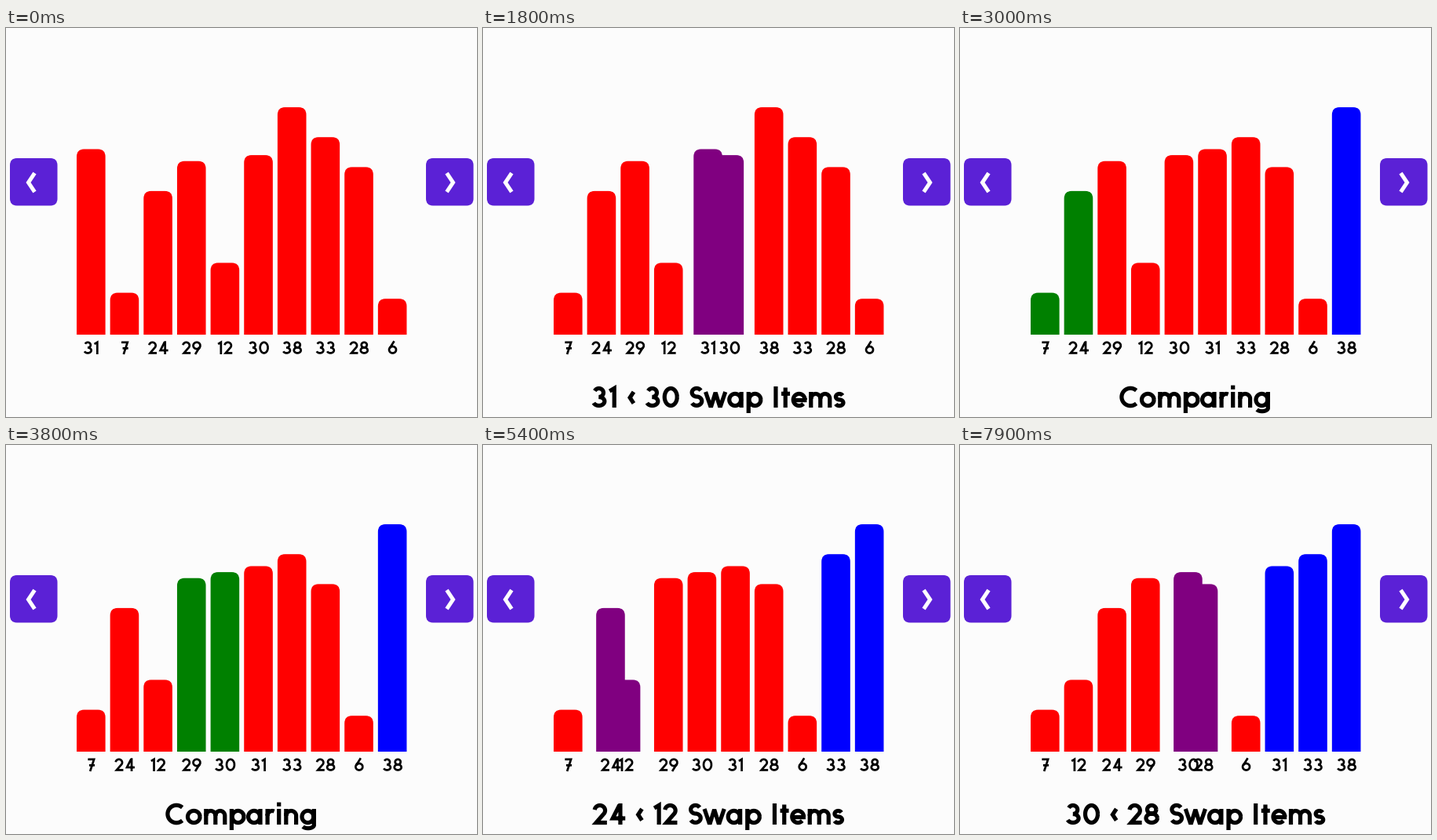
A matplotlib script that plays this animation: 600x496 px, repeating every 8 s.

```python
import numpy as np
import matplotlib.pyplot as plt
from matplotlib.animation import FuncAnimation
from matplotlib.patches import FancyBboxPatch, PathPatch
from matplotlib.path import Path

W, H, DPI = 600, 496, 100
PX = 72 / DPI                       # points per pixel
LEFT, PITCH, BAR_W, BASE, UNIT = 90, 42.65, 36.6, 391, 7.63
VALUES = [31, 7, 24, 29, 12, 30, 38, 33, 28, 6]

STEP, COMPARE, SLIDE = 238, 110, 100        # ms
PASS_STARTS = [720, 2952, 5025, 6811]


# ---- stroke lettering: y up from the baseline, capitals 27 high ----
def arc(cx, cy, rx, ry, a=0, b=360):
    t = np.radians(np.linspace(a, b, 40))
    return list(zip(cx + rx * np.cos(t), cy + ry * np.sin(t)))


def stem(x, low=0, high=20):
    return [(x, low), (x, high)]


def arch(x, r):
    """Half-round shoulder springing from x, ending in a leg."""
    return arc(x + r, 11.3, r, 6.2, 180, 0) + [(x + 2 * r, 0)]


DIGITS = {
    "0": (23, arc(11.5, 13.5, 8, 11)),
    "1": (12, [(1.5, 21), (7.5, 24.6), (7.5, 0)]),
    "2": (20, arc(9.2, 18, 6.7, 6.5, 172, -35) + [(4.5, 2.5), (18.2, 2.5)]),
    "3": (21, arc(9.5, 19, 5.8, 5.5, 155, -90),
          arc(9.5, 8, 7.2, 5.5, 90, -158)),
    "4": (22, [(21, 8), (5, 8), (13.6, 25)], stem(14.7, 0, 27)),
    "6": (20.5, arc(10.2, 9.2, 7.2, 6.8), [(13.4, 27), (4.3, 12.6)]),
    "7": (18, [(2, 24.5), (14.5, 24.5), (6.5, 0)], [(4.5, 12.3), (16, 12.3)]),
    "8": (20.5, arc(10.2, 19.2, 5.7, 5.3), arc(10.2, 8.2, 7.2, 5.7)),
    "9": (20.5, arc(10.2, 17.8, 7.2, 6.8), [(7, 0), (16.1, 14.4)]),
}
ROUND = {
    "C": (25, arc(14, 13.5, 11.2, 11.2, 48, 312)),
    "S": (18, arc(9.2, 19.3, 6, 5.3, 28, 270),
          arc(9.2, 8.3, 6.6, 5.7, 90, -152)),
    "a": (22.5, arc(10, 10, 7.4, 7.6), stem(18)),
    "e": (20.5, arc(10, 10, 7.4, 7.6, 0, 318), [(3, 9.4), (19.8, 9.4)]),
    "g": (22.5, arc(10, 10, 7.4, 7.6),
          [(18, 20), (18, -0.5)] + arc(10.4, -0.5, 7.6, 4.2, 0, -150)),
    "o": (21.5, arc(10.6, 10, 7.8, 7.6)),
    "p": (22, stem(4, -7), arc(12.2, 10, 7.4, 7.6)),
    "s": (15.5, arc(7.6, 13.8, 4.5, 3.7, 25, 270),
          arc(7.6, 6.2, 5, 3.9, 90, -155)),
}
STRAIGHT = {
    " ": (11,),
    "‹": (10, [(8, 20), (3.2, 12.7), (8, 5.4)]),
    "I": (10, stem(4.5, 0, 27)),
    "i": (8.5, stem(4), stem(4, 23.2, 28.4)),
    "m": (32, stem(4), arch(4, 6), arch(16, 6)),
    "n": (21, stem(4), arch(4, 6.4)),
    "r": (14, stem(4), arc(10, 11.3, 6, 6.2, 180, 65)),
    "t": (13, stem(6.2, 0, 25.5), [(1, 17.7), (12, 17.7)]),
    "w": (29, [(2, 20), (8, 2.4), (9.4, 2.4), (14, 17.3), (15.2, 17.3),
               (19.8, 2.4), (21.2, 2.4), (27.2, 20)]),
}
GLYPHS = {**DIGITS, **ROUND, **STRAIGHT}
TRACKING = 0.6


def text_path(text, cx, baseline, scale=1.0):
    width = sum(GLYPHS[c][0] + TRACKING for c in text) - TRACKING
    x = -width / 2
    pts, codes = [(cx, baseline)], [Path.MOVETO]
    for c in text:
        advance, *strokes = GLYPHS[c]
        for s in strokes:
            pts += [(cx + (x + px) * scale, baseline - py * scale)
                    for px, py in s]
            codes += [Path.MOVETO] + [Path.LINETO] * (len(s) - 1)
        x += advance + TRACKING
    return Path(pts, codes)


def bar_path(x, value, r=9.5):
    top, right = BASE - value * UNIT, x + BAR_W
    pts = [(x, BASE), (x, top + r), (x, top), (x + r, top), (right - r, top),
           (right, top), (right, top + r), (right, BASE), (x, BASE)]
    L, Q = Path.LINETO, Path.CURVE3
    return Path(pts, [Path.MOVETO, L, Q, Q, L, Q, Q, L, Path.CLOSEPOLY])


# ---- bubble sort timeline ----
def plan():
    steps, order = [], VALUES[:]
    for done, start in enumerate(PASS_STARTS):
        last = len(order) - 2 - done
        for i in range(last + 1):
            swap = order[i] > order[i + 1]
            steps.append((start + i * STEP, order[:], i, swap, done, i == last))
            if swap:
                order[i], order[i + 1] = order[i + 1], order[i]
    return steps


STEPS = plan()


def state(t):
    """Slot and colour of every value, and the message, at time t."""
    past = [s for s in STEPS if s[0] <= t]
    if not past:
        return {v: (k, "red") for k, v in enumerate(VALUES)}, ""
    start, order, i, swap, done, last = past[-1]
    age = t - start
    a, b = order[i], order[i + 1]
    slots = {v: float(k) for k, v in enumerate(order)}
    message, active = "Comparing", "green"
    if swap and age >= COMPARE:
        p = min(1, (age - COMPARE) / SLIDE)
        slots[a] += p
        slots[b] -= p
        message, active = f"{a} ‹ {b} Swap Items", "purple"
    resting = last and age >= STEP
    done += resting
    fixed = sorted(VALUES)[len(VALUES) - done:]

    def colour(v):
        if v in fixed:
            return "blue"
        return active if v in (a, b) and not resting else "red"

    return {v: (slots[v], colour(v)) for v in VALUES}, message


# ---- stage ----
fig = plt.figure(figsize=(W / DPI, H / DPI), dpi=DPI, facecolor="#fcfcfc")
ax = fig.add_axes([0, 0, 1, 1])
ax.set(xlim=(0, W), ylim=(H, 0))
ax.axis("off")


def stroke(path, width, color="black"):
    return ax.add_patch(PathPatch(path, fill=False, edgecolor=color, lw=width * PX,
                                  capstyle="butt", joinstyle="miter", zorder=3))


for bx, xs in ((5, (36.5, 28.5)), (535, (561.5, 569.5))):
    ax.add_patch(FancyBboxPatch((bx, 166), 60.5, 60.5, fc="#5b21d6", lw=0,
                                boxstyle="round,pad=0,rounding_size=9"))
    stroke(Path([(xs[0], 185), (xs[1], 197), (xs[0], 209)]), 5, "white")

bars = {v: ax.add_patch(PathPatch(bar_path(0, v), lw=0)) for v in VALUES}
labels = {v: stroke(text_path(str(v), 0, 416), 2.7) for v in VALUES}
title = stroke(text_path("", W / 2, 484), 5.2)


def draw(k):
    places, message = state(k * 100)
    for v, (slot, color) in places.items():
        x = LEFT + slot * PITCH
        bars[v].set_path(bar_path(x, v))
        bars[v].set_facecolor(color)
        labels[v].set_path(text_path(str(v), x + BAR_W / 2 + 0.4, 416, 0.62))
    title.set_path(text_path(message, W / 2, 484))
    title.set_visible(bool(message))
    return [*bars.values(), *labels.values(), title]


anim = FuncAnimation(fig, draw, frames=80, interval=100, repeat=True,
                     repeat_delay=0, blit=False)
plt.show()
```
